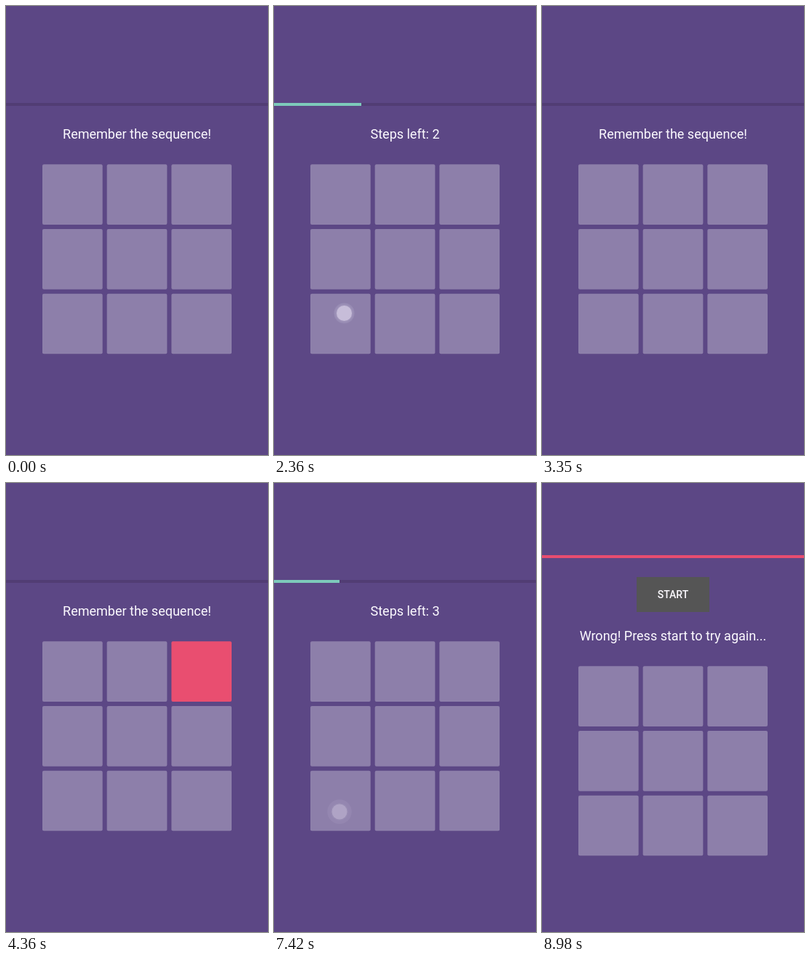
Recreate the animation shown at these times as an HTML page with a canvas. Size 360 by 616 pixels, loop 9.24 s.

```html
<!DOCTYPE html>
<html lang="en">
<head>
<meta charset="utf-8">
<title>Sequence game</title>
<style>
  html, body { margin: 0; width: 100%; height: 100%; overflow: hidden; background: #5c4785; }
  canvas { display: block; width: 360px; height: 616px; }
</style>
</head>
<body>
<canvas id="stage"></canvas>
<script>
const W = 360, H = 616, LOOP = 9240;
const canvas = document.getElementById('stage');
const ctx = canvas.getContext('2d');
const ratio = window.devicePixelRatio || 1;
canvas.width = W * ratio;
canvas.height = H * ratio;

const COLOR = {
  bg: '#5c4785', track: '#513d74', done: '#7dcabb', fail: '#e74d70',
  lit: '#e94e70', button: '#555555', text: '#fcfaff'
};
const CELL = 82.67, PITCH = 88.67, GRID_X = 50, GRID_Y = 217.3;
const FAIL_AT = 8560, FAIL_SHIFT = 34;
const DIM = 0.3, DIM_IN = 150, DIM_OUT = 250, DOT_OUT = 200;

// Cells are numbered row by row from the top left.
const flashes = [
  { cell: 2, on: 30, off: 350 },
  { cell: 0, on: 850, off: 1240 },
  { cell: 6, on: 3500, off: 3900 },
  { cell: 2, on: 4360, off: 4750 },
  { cell: 0, on: 5180, off: 5530 },
  { cell: 8, on: 6020, off: 6380 }
];

// "quick" taps are released without dimming their cell.
const taps = [
  { cell: 6, x: 96.5, y: 421.5, down: 2030, up: 2360, quick: true },
  { cell: 2, x: 275.5, y: 249.5, down: 2480, up: 2700 },
  { cell: 0, x: 93, y: 256, down: 2830, up: 3010 },
  { cell: 6, x: 90, y: 451, down: 7170, up: 7330, quick: true },
  { cell: 2, x: 273, y: 254, down: 7480, up: 7680 },
  { cell: 0, x: 93, y: 258, down: 7830, up: 7990 },
  { cell: 5, x: 270, y: 346, down: 8260, up: FAIL_AT }
];

const rounds = [
  { start: 1670, end: 3350, steps: 3 },
  { start: 6840, end: FAIL_AT, steps: 4 }
];

const clamp = v => Math.min(1, Math.max(0, v));
const ease = v => v * v * (3 - 2 * v);

function label(text, y, font) {
  ctx.font = font;
  ctx.textAlign = 'center';
  ctx.textBaseline = 'alphabetic';
  ctx.fillStyle = COLOR.text;
  ctx.fillText(text, 180, y);
}

function box(x, y, w, h, r, fill) {
  ctx.fillStyle = fill;
  ctx.beginPath();
  ctx.roundRect(x, y, w, h, r);
  ctx.fill();
}

function disc(x, y, r, alpha) {
  ctx.fillStyle = `rgba(235, 228, 245, ${alpha})`;
  ctx.beginPath();
  ctx.arc(x, y, r, 0, Math.PI * 2);
  ctx.fill();
}

function cellOpacity(cell, t) {
  let opacity = 1;
  for (const tap of taps) {
    if (tap.cell !== cell || tap.quick || t < tap.down) continue;
    const pressed = ease(clamp((t - tap.down) / DIM_IN));
    const released = ease(clamp((t - tap.up) / DIM_OUT));
    opacity = Math.min(opacity, 1 - (1 - DIM) * pressed * (1 - released));
  }
  return opacity;
}

function drawGrid(t, shift) {
  for (let i = 0; i < 9; i++) {
    const x = GRID_X + (i % 3) * PITCH;
    const y = GRID_Y + Math.floor(i / 3) * PITCH + shift;
    const lit = flashes.some(f => f.cell === i && t >= f.on && t < f.off);
    const fill = lit ? COLOR.lit : `rgba(255, 255, 255, ${0.3 * cellOpacity(i, t)})`;
    box(x, y, CELL, CELL, 2, fill);
  }
}

function drawDots(t) {
  for (const tap of taps) {
    if (t < tap.down || t >= tap.up + DOT_OUT) continue;
    const fade = clamp((t - tap.up) / DOT_OUT);
    const alpha = 1 - fade;
    disc(tap.x, tap.y, 14 + 6 * fade, 0.13 * alpha);
    disc(tap.x, tap.y, 12, 0.1 * alpha);
    disc(tap.x, tap.y, 10.5, 0.52 * alpha);
  }
}

function draw(t) {
  const failed = t >= FAIL_AT;
  const shift = failed ? FAIL_SHIFT : 0;
  const round = rounds.find(r => t >= r.start && t < r.end);
  let message = 'Remember the sequence!';
  let progress = 0;

  if (round) {
    const hits = taps.filter(p => p.up >= round.start && p.up <= t).length;
    progress = hits / round.steps;
    message = 'Steps left: ' + (round.steps - hits);
  } else if (failed) {
    progress = 1;
    message = 'Wrong! Press start to try again...';
  }

  ctx.setTransform(ratio, 0, 0, ratio, 0, 0);
  ctx.fillStyle = COLOR.bg;
  ctx.fillRect(0, 0, W, H);

  ctx.fillStyle = COLOR.track;
  ctx.fillRect(0, 133 - shift, W, 4);
  ctx.fillStyle = failed ? COLOR.fail : COLOR.done;
  ctx.fillRect(0, 133 - shift, W * progress, 4);

  if (failed) {
    box(130, 129, 100, 48, 0, COLOR.button);
    label('START', 158, '500 14px Roboto, sans-serif');
  }
  label(message, 182 + shift, '18px Roboto, sans-serif');
  drawGrid(t, shift);
  drawDots(t);
}

const began = performance.now();
function tick() {
  draw((performance.now() - began) % LOOP);
  requestAnimationFrame(tick);
}
tick();
</script>
</body>
</html>
```
